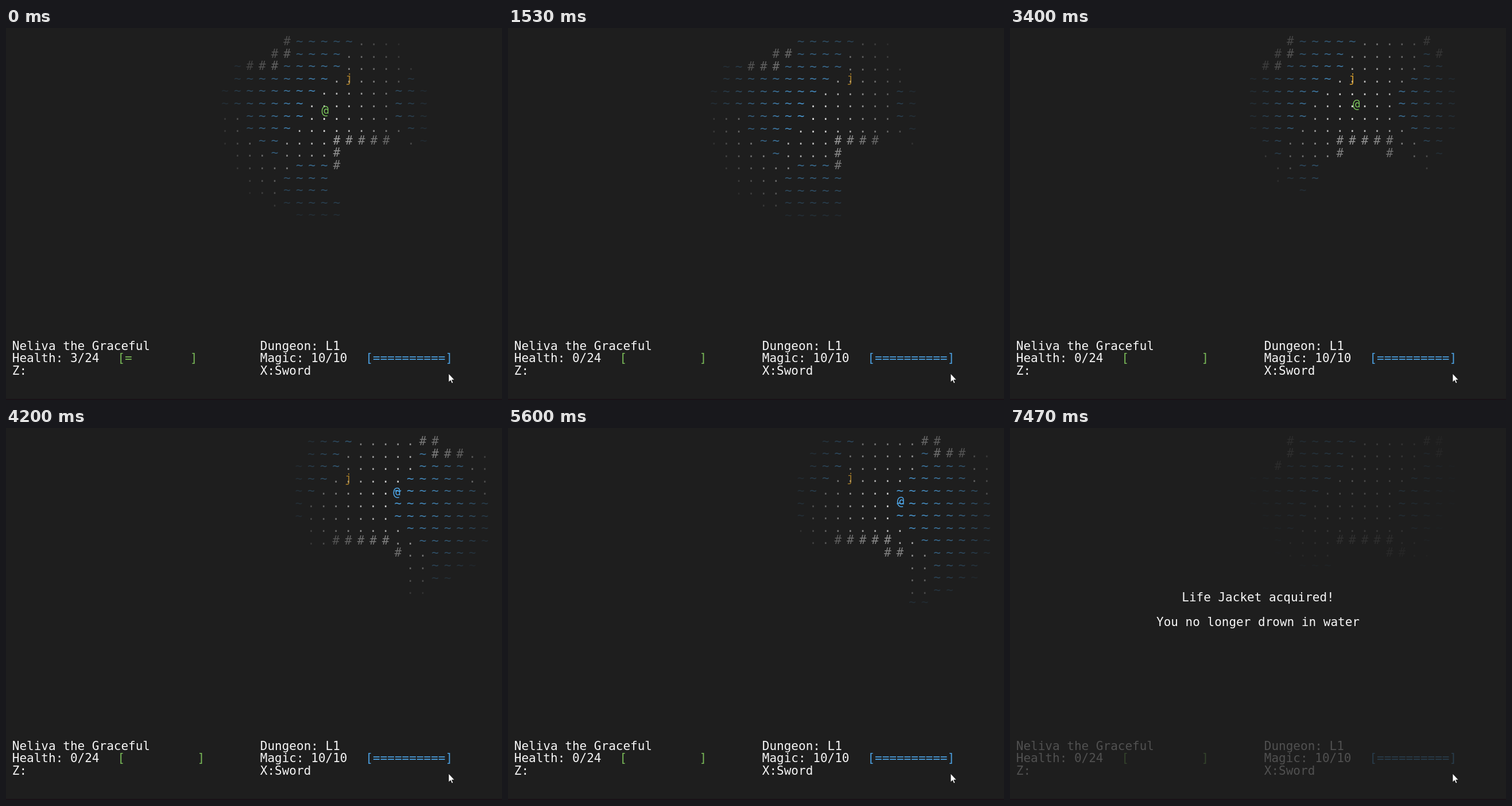
An HTML page with a canvas that plays this animation: 864 px wide and 648 px high, repeating every 8 s.

```html
<!DOCTYPE html>
<html lang="en">
<head>
<meta charset="utf-8">
<title>Dungeon</title>
<style>
  html, body { margin: 0; width: 100%; height: 100%; overflow: hidden; background: #1e1e1e; }
  canvas, svg { position: absolute; left: 0; top: 0; width: 864px; height: 648px; }
  text { font: 21px "DejaVu Sans Mono", monospace; fill: #f6f6f6; white-space: pre; }
  .hp { fill: #78b857; }
  .mp { fill: #4b9fdf; }
  #note { text-anchor: middle; }
</style>
</head>
<body>
<canvas id="map" width="864" height="648"></canvas>
<svg viewBox="0 0 864 648">
  <rect y="646" width="864" height="2" fill="#191217"/>
  <g id="hud">
    <text x="10.8" y="561">Neliva the Graceful</text>
    <text x="10.8" y="582.4" id="health"></text>
    <text x="194.4" y="582.4" id="bar" class="hp"></text>
    <text x="10.8" y="604">Z:</text>
    <text x="442.8" y="561">Dungeon: L1</text>
    <text x="442.8" y="582.4">Magic: 10/10</text>
    <text x="626.4" y="582.4" class="mp">[==========]</text>
    <text x="442.8" y="604">X:Sword</text>
  </g>
  <g id="note" opacity="0">
    <text x="432" y="301.8">Life Jacket acquired!</text>
    <text x="432" y="345">You no longer drown in water</text>
  </g>
  <path d="M771 602v15l3.4-3.2 2.2 5.2 2.3-1-2.2-5h4.6z" fill="#fff" stroke="#111" stroke-width=".8"/>
</svg>
<script>
const LOOP = 8000, STEP = 1000 / 15, TILE = 21.6, REACH = 8.5;
const DROWN = 1100, WAKE = 2750, FOUND = 6990;
const COLORS = { '#': '#cccccc', '.': '#e6e6e6', '~': '#4fa8ea' };
const ITEM = { c: 27, r: 3, color: '#dfa42e' };

// Wall runs: row, first column, last column
const WALLS = [
  [0, 22, 22], [0, 33, 34], [1, 21, 22], [1, 34, 36], [2, 19, 21],
  [8, 26, 30], [9, 26, 26], [9, 30, 31], [10, 26, 26]
];

// Stops of the walk: time, column, row
const WALK = [
  [0, 25.07, 5.6], [750, 22, 6], [DROWN - 100, 22, 6], [DROWN, 24, 6], [WAKE, 24, 6],
  [4100, 30.9, 4.1], [4900, 30.9, 4.1], [5550, 31.05, 4.9], [6080, 31.05, 4.9],
  [6470, 29.47, 5], [FOUND, 27, 3]
];

const $ = id => document.getElementById(id);
const ctx = $('map').getContext('2d');
const clamp = v => Math.min(1, Math.max(0, v));

// The land lies between a west, a south and an east lake
function cell(c, r) {
  if (WALLS.some(([row, a, b]) => r === row && c >= a && c <= b)) return '#';
  const outside = r < 2 && c < 22 || r === 0 && c > 34;
  const rock = r > 8 && c > 26 && c < 32;
  if (r < 0 || outside || rock) return ' ';

  const beach = r < 6 ? 0 : 18 + Math.max(0, r - 7);
  const west = r < 10 && c > beach && c <= 27.4 - .69 * r;
  const south = r > 9 && Math.abs(c - 24) <= (r > 10 ? 2 : 1) || r > 12 && c > 31;
  const shore = 31 + Math.min(3, Math.floor(.75 * Math.abs(r - 4.8)));
  const east = r > 0 && c >= shore && c <= 36 + Math.max(0, r - 3);
  return west || south || east ? '~' : '.';
}

// Line of sight: one sample per tile along the longer axis
function sees(c0, r0, c, r) {
  const dc = c - c0, dr = r - r0, n = Math.max(Math.abs(dc), Math.abs(dr));
  const slack = cell(c, r) === '#' && dr >= Math.abs(dc) ? .23 : .37;
  for (let i = 1; i < n; i++) {
    const x = c0 + dc * i / n, y = r0 + dr * i / n;
    const cx = Math.round(x), cy = Math.round(y), ch = cell(cx, cy);
    if (ch === ' ') return false;
    if (ch === '#' && Math.hypot(x - cx, y - cy) < slack) return false;
  }
  return true;
}

function place(t) {
  const i = WALK.findIndex(k => k[0] > t);
  if (i < 0) return [ITEM.c, ITEM.r];
  const [t0, x0, y0] = WALK[i - 1], [t1, x1, y1] = WALK[i];
  const f = (t - t0) / (t1 - t0);
  return [x0 + (x1 - x0) * f, y0 + (y1 - y0) * f];
}

function draw(t) {
  const [px, py] = place(t);
  const c0 = Math.round(px + .1), r0 = Math.round(py);
  const fade = clamp((t - FOUND) / 470), dim = 1 - .77 * fade, found = fade > 0;
  const driftX = -1.2 * clamp(t / 1200), driftY = .5 * Math.sin(2 * Math.PI * t / 8400);

  const glyph = (ch, c, r, color, alpha) => {
    ctx.globalAlpha = alpha * dim;
    ctx.fillStyle = color;
    ctx.fillText(ch, 14.4 + TILE * c + driftX, 30 + TILE * r + driftY);
  };

  ctx.globalAlpha = 1;
  ctx.fillStyle = '#1e1e1e';
  ctx.fillRect(0, 0, 864, 648);
  ctx.font = '21px "DejaVu Sans Mono", monospace';
  ctx.textAlign = 'center';

  for (let r = Math.max(0, r0 - 8); r <= r0 + 8; r++) {
    for (let c = c0 - 8; c <= Math.min(38, c0 + 8); c++) {
      const ch = cell(c, r), d = Math.hypot(c - c0, r - r0);
      if (ch === ' ' || d > REACH || !sees(c0, r0, c, r)) continue;
      const light = 1 - d / 9.2;
      glyph(ch, c, r, COLORS[ch], light);
      if (c === ITEM.c && r === ITEM.r && !found) glyph('j', c, r, ITEM.color, light + .1);
    }
  }

  const gone = found || t >= DROWN && t < WAKE;
  if (!gone) glyph('@', px, py, cell(c0, r0) === '~' ? COLORS['~'] : '#78c259', 1);

  const hp = t < DROWN ? 3 : 0;
  $('health').textContent = `Health: ${hp}/24`;
  $('bar').textContent = hp ? '[=' + ' '.repeat(8) + ']' : '[' + ' '.repeat(10) + ']';
  $('hud').setAttribute('opacity', dim);
  $('note').setAttribute('opacity', fade);
}

const start = performance.now();
function tick() {
  const t = (performance.now() - start) % LOOP;
  draw(Math.floor((t + 5) / STEP) * STEP);
  requestAnimationFrame(tick);
}
tick();
</script>
</body>
</html>
```
